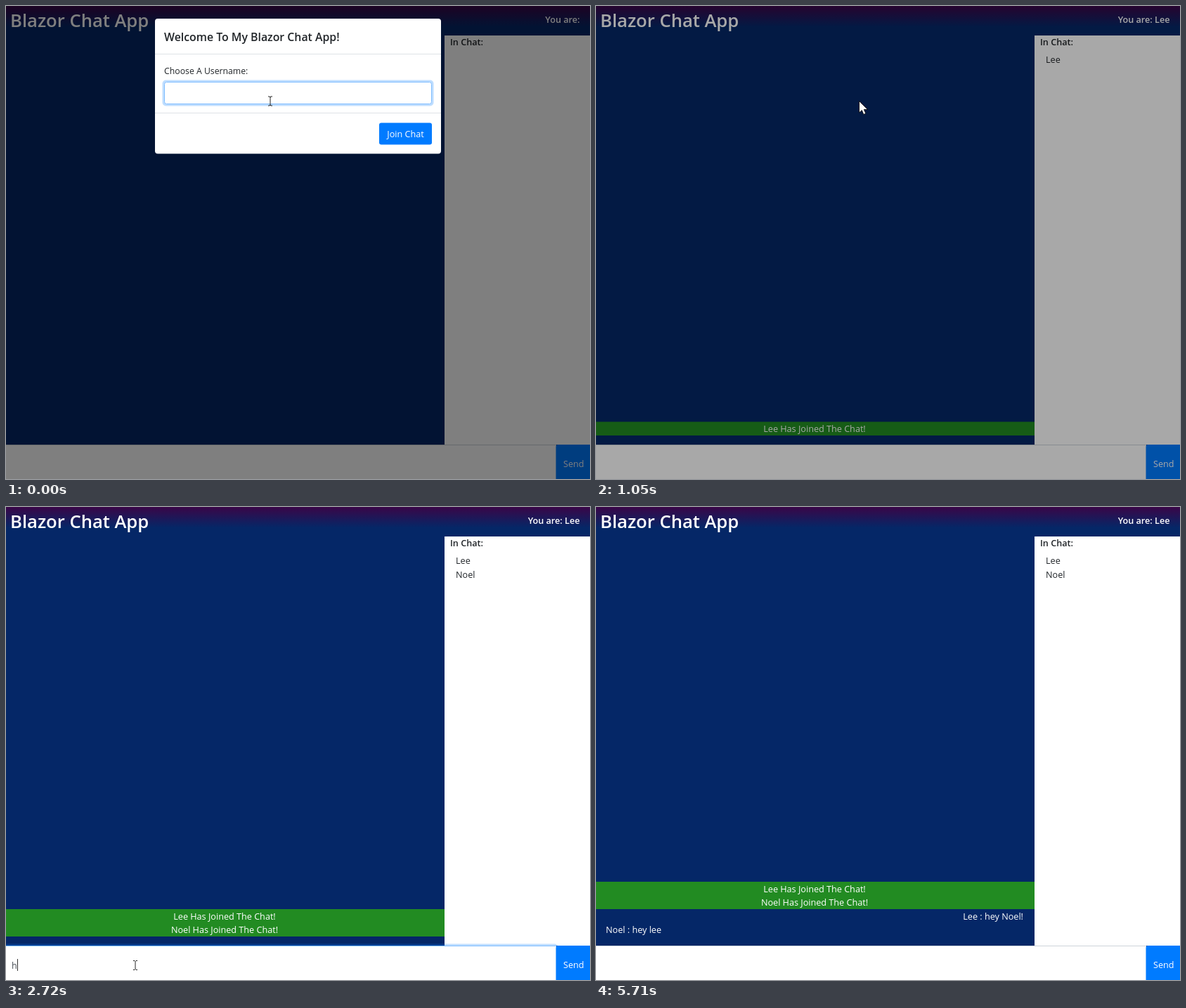
An HTML page for the animation above (6.49 s loop, 831 by 674 pixels).

```html
<!DOCTYPE html>
<html lang="en">
<head>
<meta charset="utf-8">
<title>Blazor Chat App</title>
<style>
  html, body { margin: 0; width: 100%; height: 100%; overflow: hidden; background: #052767; }
  svg { display: block; }
  text { font: 12.65px "Open Sans", "Noto Sans", sans-serif; white-space: pre; fill: #212529; }
  .bold { font-weight: 600; }
  .title { font-size: 25.6px; }
  .heading { font-size: 15.85px; }
  .label { font-size: 12.25px; }
  .light { fill: #fff; }
  .typed { fill: #495057; }
  .mid { text-anchor: middle; }
  .end { text-anchor: end; }
</style>
</head>
<body>
<svg width="831" height="674">
  <defs>
    <linearGradient id="top" x2="0" y2="1">
      <stop stop-color="#3a0647"/>
      <stop offset=".7" stop-color="#052767"/>
    </linearGradient>
  </defs>

  <rect width="831" height="674" fill="#052767"/>
  <rect width="831" height="42" fill="url(#top)"/>
  <text class="bold title light" x="6" y="30">Blazor Chat App</text>
  <text class="bold light end" id="you" x="816.5" y="23.5"></text>

  <rect x="624" y="42" width="207" height="583" fill="#fff"/>
  <text class="bold" x="632" y="56">In Chat:</text>
  <text id="user1" x="640" y="81">Lee</text>
  <text id="user2" x="640" y="101">Noel</text>

  <g id="log">
    <rect id="bar" width="624" fill="#228b22"/>
    <text class="light mid" x="311" y="14.5">Lee Has Joined The Chat!</text>
    <text class="light mid" id="join2" x="311" y="34">Noel Has Joined The Chat!</text>
    <text class="light end" id="say1" x="608" y="53.5">Lee : hey Noel!</text>
    <text class="light" id="say2" x="14" y="73">Noel : hey lee</text>
  </g>

  <rect id="ring" x="-3" y="622.5" width="788.5" height="60" rx="5" fill="#007bff" fill-opacity=".25"/>
  <rect y="625" width="783" height="49" fill="#fff"/>
  <rect id="edge" y="625" width="783" height="1"/>
  <text class="typed" id="draft" x="8" y="657.5"></text>
  <rect id="draftCaret" y="644" width="1" height="17" fill="#333"/>
  <rect x="782.5" y="625" width="55" height="55" rx="3" fill="#007bff"/>
  <text class="light" x="793" y="657">Send</text>

  <rect id="shade" width="831" height="674"/>

  <g id="modal">
    <rect x="212" y="18" width="407" height="192.5" rx="4" fill="#fff"/>
    <path d="M212 68.5H619M212 152.5H619" stroke="#dee2e6"/>
    <text class="bold heading" x="225" y="50">Welcome To My Blazor Chat App!</text>
    <text class="label" x="225" y="97">Choose A Username:</text>
    <rect x="222.5" y="105.5" width="386" height="37" rx="5" fill="#007bff" fill-opacity=".25"/>
    <rect x="225.5" y="108.5" width="380" height="31" rx="3" fill="#fff" stroke="#80bdff"/>
    <text class="typed" id="name" x="235.5" y="129"></text>
    <rect id="nameCaret" y="115" width="1" height="17" fill="#333"/>
    <rect x="531" y="166.5" width="75" height="31" rx="3" fill="#007bff"/>
    <text class="light mid" x="568.5" y="187">Join Chat</text>
  </g>

  <path id="beam" d="M-3 -6.5H-1L0 -5.5L1 -6.5H3M0 -5.5V5.5M-3 6.5H-1L0 5.5L1 6.5H3" fill="none" stroke="#222"/>
  <path id="arrow" d="M0 0V16.5L3.8 13L6.3 19L9.3 17.7L6.8 12H12Z" fill="#fff" stroke="#000" stroke-width=".8"/>
</svg>

<script>
const LOOP = 6490, LINE = 19.5;
const NAME_KEYS = [50, 190, 330];
const DRAFT_KEYS = [2640, 2730, 2820, 2980, 3700, 3850, 4040, 4150, 4890];
const CLOSE = 836, FADE = 1002, JOIN2 = 1900, FOCUS = 2550, SENT = 5100, REPLY = 5710;

const el = id => document.getElementById(id);
const clamp = v => Math.min(1, Math.max(0, v));
const show = (id, on) => el(id).setAttribute('visibility', on ? 'visible' : 'hidden');
const set = (id, attr, value) => el(id).setAttribute(attr, value);
const move = (id, x, y) => set(id, 'transform', `translate(${x} ${y})`);
const typed = (text, keys, t) => text.slice(0, keys.filter(k => k <= t).length);

function type(id, text) {
  const field = el(id);
  if (field.textContent !== text) field.textContent = text;
  const end = +field.getAttribute('x') + (text ? field.getComputedTextLength() : 0);
  set(id + 'Caret', 'x', Math.round(end));
}

// CSS ease-out: cubic-bezier(0, 0, .58, 1)
function easeOut(x) {
  let lo = 0, hi = 1;
  for (let i = 0; i < 16; i++) {
    const s = (lo + hi) / 2;
    if (1.74 * s * s * (1 - s) + s ** 3 < x) lo = s; else hi = s;
  }
  return 3 * lo * lo * (1 - lo) + lo ** 3;
}

function draw(t) {
  const joined = t >= 860, both = t >= JOIN2, sent = t >= SENT, reply = t >= REPLY;
  const focused = t >= FOCUS && !reply;

  el('you').textContent = ('You are: ' + typed('Lee', NAME_KEYS, t - 60)).trim();
  type('name', typed('Lee', NAME_KEYS, t));
  show('nameCaret', t >= 50 && t < 986);

  const closing = joined ? t - CLOSE : 0;
  move('modal', 0, -40.75 * easeOut(clamp(closing / 300)));
  set('modal', 'opacity', 1 - clamp(closing / 150));
  set('shade', 'opacity', 0.5 * (1 - clamp((t - FADE) / 150)));

  show('user1', joined);
  show('user2', both);
  const lines = joined + both + sent + reply;
  move('log', 0, 612 - lines * LINE);
  set('log', 'display', joined ? 'inline' : 'none');
  set('bar', 'height', LINE * (both ? 2 : 1));
  show('join2', both);
  show('say1', sent);
  show('say2', reply);

  show('ring', focused);
  set('edge', 'fill', focused ? '#80bdff' : '#ced4da');
  type('draft', sent ? '' : typed('hey Noel!', DRAFT_KEYS, t));
  const blink = (t >= 3550 && t < 3700) || (t >= 4760 && t < 4890) || t >= 5620;
  show('draftCaret', focused && !blink);

  show('beam', !joined || focused);
  if (joined) move('beam', 184, 653);
  else move('beam', 376, 135.5);

  const away = clamp((t - 1680) / 220);
  show('arrow', joined && away < 1);
  move('arrow', 374.5 - 390 * away * away, 135.5 + 60 * away * away);
}

let start;
function tick(now) {
  start ??= now;
  draw((now - start) % LOOP);
  requestAnimationFrame(tick);
}
draw(0);
requestAnimationFrame(tick);
</script>
</body>
</html>
```
